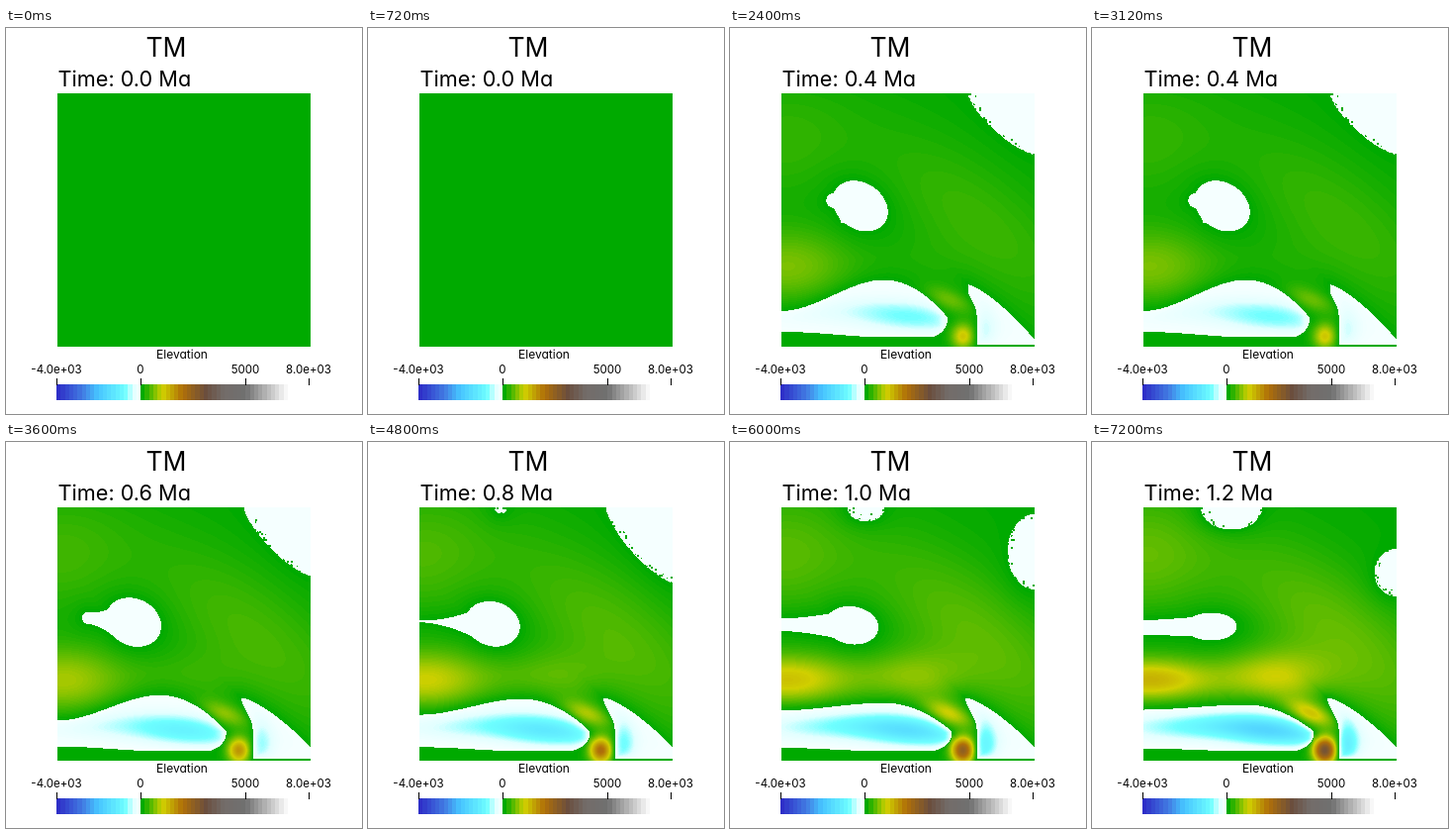
Recreate the animation shown at these times as an HTML page with a canvas. Size 360x390 px, loop 8000 ms.

```html
<!DOCTYPE html>
<html lang="en">
<head>
<meta charset="utf-8">
<title>Elevation model</title>
<style>
  html, body { margin: 0; width: 100%; height: 100%; overflow: hidden; background: #fff; }
  canvas, svg { position: absolute; left: 0; top: 0; width: 360px; height: 390px; }
  text { font-family: Inter, Lato, sans-serif; font-feature-settings: "cv11"; font-weight: 400; fill: #000; }
  .small { font-size: 11.5px; text-anchor: middle; }
</style>
</head>
<body>
<canvas id="view" width="360" height="390"></canvas>
<svg viewBox="0 0 360 390">
  <text x="162" y="28.5" font-size="26.5" text-anchor="middle">TM</text>
  <text id="clock" x="52.5" y="59" font-size="21.7">Time: 0.0 Ma</text>
  <text class="small" x="178" y="334" style="font-size: 12px">Elevation</text>
  <text class="small" x="51" y="349">-4.0e+03</text>
  <text class="small" x="136" y="349">0</text>
  <text class="small" x="242" y="349">5000</text>
  <text class="small" x="306" y="349">8.0e+03</text>
  <path d="M51.5 354v7M136.5 354v7M242.5 354v7M306.5 354v7" stroke="#000"/>
</svg>
<script>
const LEFT = 52, TOP = 66, SIZE = 256;
const LOOP = 8000, STEP = 1200, LAST = 6;
const BAND = 0.75;

// Heights are in colour-bar pixels from sea level
const STOPS = [
  [-85, 0x2d2ac6], [-60, 0x4178e1], [-44, 0x46c3ff], [-16, 0x6effff], [-8, 0xe1ffff], [-0.01, 0xfaffff],
  [0, 0x00aa00], [20, 0xd0d000], [40, 0xb07008], [64, 0x6a4e3e],
  [82, 0x736c69], [104, 0x707070], [147, 0xffffff]
].map(([h, rgb]) => [h, rgb >> 16, rgb >> 8 & 255, rgb & 255]);

const ctx = document.getElementById("view").getContext("2d");
const clock = document.getElementById("clock");

const clamp = v => Math.max(0, Math.min(1, v));
const mix = (a, b, k) => a + (b - a) * k;
const ramp = (a, b, v) => { const k = clamp((v - a) / (b - a)); return k * k * (3 - 2 * k); };
const hash = (a, b) => { const v = Math.sin(a * 12.9898 + b * 78.233) * 43758.5453; return v - Math.floor(v); };

function colour(h) {
  let i = 1;
  while (i < STOPS.length - 1 && STOPS[i][0] < h) i++;
  const a = STOPS[i - 1], b = STOPS[i], k = clamp((h - a[0]) / (b[0] - a[0]));
  return [1, 2, 3].map(c => Math.round(mix(a[c], b[c], k)));
}

function bump(x, y, cx, cy, sx, sy, angle = 0) {
  const dx = x - cx, dy = y - cy, c = Math.cos(angle), s = Math.sin(angle);
  const u = (dx * c + dy * s) / sx, v = (dy * c - dx * s) / sy;
  return Math.exp(-(u * u + v * v) / 2);
}

// Shapes return the distance to their shore, positive inside the water
function oval(x, y, cx, cy, rx, ry, { angle = 0, power = 2 } = {}) {
  const dx = x - cx, dy = y - cy, c = Math.cos(angle), s = Math.sin(angle);
  const u = Math.abs(dx * c + dy * s) / rx, v = Math.abs(dy * c - dx * s) / ry;
  return (1 - (u ** power + v ** power) ** (1 / power)) * Math.min(rx, ry);
}

function taper(x, y, ax, ay, ar, bx, by, br) {
  const k = clamp((x - ax) / (bx - ax));
  return mix(ar, br, k * k) - Math.hypot(x - mix(ax, bx, k), y - mix(ay, by, k));
}

function southSea(x, y, n) {
  const west = 286 - 16 * ramp(1.5, 5.5, n);
  const crest = 254 + 11 * ramp(2.2, 6, n);
  const tip = 219 + 5 * ramp(1.5, 4, n);
  const top = x < 155 ? mix(west, crest, ramp(52, 155, x))
                      : mix(crest, 292, ((x - 155) / (tip - 155)) ** 2);
  const end = clamp((x - 200) / (tip - 200));
  const base = mix(305 + 0.7 * n, 312, ramp(52, 160, x));
  const bottom = mix(293, base, Math.sqrt(1 - end * end));
  return Math.min(y - top, bottom - y, tip - x);
}

function eastSea(x, y, n) {
  const wall = Math.max(237 + 12 * ramp(255, 290, y), 258 - 9 * n);
  const reach = Math.min(70, 50 + 7 * n);
  const top = 258 + 50 * Math.max(0, (x - 238) / reach) ** 1.4;
  return Math.min(x - wall, y - top, 320 - y);
}

function lake(x, y, n) {
  const k = (n - 1) / 5, cy = 174 + 12 * Math.sqrt(k), ry = 21 + 16 * k - 23 * k * k;
  const body = oval(x, y, mix(134, 120, k), cy, mix(31, 26, k), ry, { angle: 0.75 * (1 - k) });
  const tail = taper(x, y, Math.max(40, 122 - 4.4 * n * n), 167 + 3.4 * n,
    Math.min(7.5, 1 + 5 * Math.abs(n - 4)), 112, cy, 0.75 * ry);
  return Math.max(body, tail);
}

// A wedge in the corner that later breaks off as a shrinking pool
function corner(x, y, n) {
  const bottom = 114 + 7 * n;
  if (n < 5) return oval(x, y, 308, TOP, 68, bottom - TOP, { power: 1.35 });
  const top = 72 + 35 * (n - 5);
  return oval(x, y, 309, (top + bottom) / 2, 54 - 5 * n, (bottom - top) / 2);
}

function northPool(x, y, n) {
  const g = n - 3.5;
  return g > 0 ? oval(x, y, 132 + 3.5 * g, TOP, 12.5 * g, 8 * g + 2) : -99;
}

function shore(x, y, n) {
  if (!n) return -99;
  const ragged = Math.max(corner(x, y, n), northPool(x, y, n));
  const grit = ragged > 0 ? 8 * hash(x >> 1, (y >> 1) + n) ** 12 : 0;
  return Math.max(southSea(x, y, n), eastSea(x, y, n), lake(x, y, n), ragged - grit);
}

const grow = (n, amount, power) => amount * (n / LAST) ** power;

function land(x, y, n, dist) {
  const plain = grow(n, 0.6, 0.5)
    + grow(n, 27, 0.75) * bump(x, y, 58, 241, 46, mix(32, 16, n / LAST))
    + grow(n, 18, 2.3) * bump(x, y, 182, 238, 38, 19)
    + grow(n, 9.5, 0.5) * bump(x, y, 252, 198, 100, 40, 0.7)
    + grow(n, 9, 0.6) * bump(x, y, 52, 114, 52, 42);
  const hills = grow(n, 20, 0.7) * bump(x, y, 221, 274, 17, 7, 0.4)
    + grow(n, 60, 0.9) * bump(x, y, 235, 311, 8, 9);
  return plain * (1 - Math.exp(dist / 9)) + hills * (1 - Math.exp(dist / 2));
}

function sea(x, y, n, dist) {
  const depth = grow(n, 30, 0.7) * bump(x, y, 184, 292, 40, 11, 0.1)
    + grow(n, 15, 1.2) * bump(x, y, 105, 287, 50, 10)
    + grow(n, 22, 1) * bump(x, y, 256, 308, 9, 20);
  return -1 - depth * (1 - Math.exp(-dist / 5));
}

function buildMap(n) {
  const img = ctx.createImageData(SIZE, SIZE);
  for (let i = 0; i < SIZE * SIZE; i++) {
    const x = LEFT + i % SIZE, y = TOP + Math.floor(i / SIZE);
    const dist = shore(x, y, n);
    const h = dist > 0 ? sea(x, y, n, dist) : land(x, y, n, dist);
    img.data.set([...colour(Math.floor(h / BAND) * BAND), 255], i * 4);
  }
  return img;
}

function drawBar() {
  const step = 170 / 40;
  for (let i = -20; i < 40; i++) {
    const x = Math.round(136 + i * step);
    ctx.fillStyle = `rgb(${colour(i < 0 ? (i + 0.4) * step : i * step)})`;
    ctx.fillRect(x, 360, Math.round(136 + (i + 1) * step) - x, 16);
  }
}

const maps = Array.from({ length: LAST + 1 }, (_, n) => buildMap(n));
drawBar();

let shown = -1;
function tick() {
  const n = Math.min(LAST, Math.floor(performance.now() % LOOP / STEP));
  if (n !== shown) {
    shown = n;
    ctx.putImageData(maps[n], LEFT, TOP);
    clock.textContent = `Time: ${(n * 0.2).toFixed(1)} Ma`;
  }
  requestAnimationFrame(tick);
}
tick();
</script>
</body>
</html>
```
